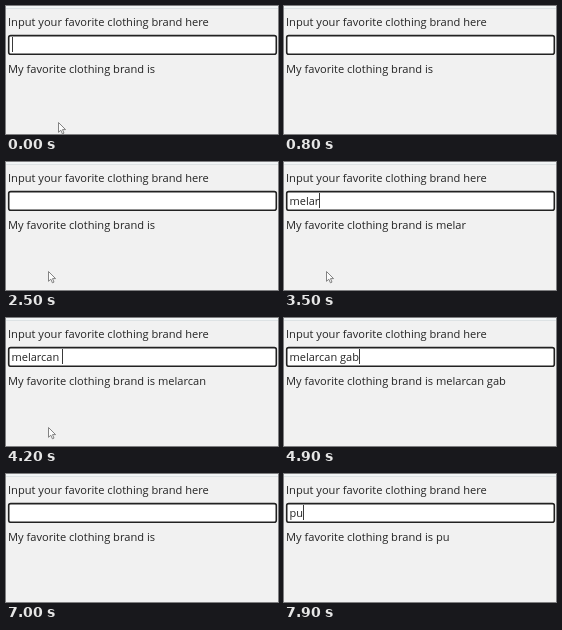
Write an HTML page that moves like this. It is 272 px wide and 128 px high and loops after 8000 ms.

```html
<!DOCTYPE html>
<html lang="en">
<head>
<meta charset="utf-8">
<title>Live input</title>
<style>
  html, body { margin: 0; width: 100%; height: 100%; overflow: hidden; background: #f1f1f1; }
  #stage {
    position: relative; width: 272px; height: 128px; overflow: hidden;
    background: #f1f1f1; color: #242424;
    font: 11.1px/15px "Open Sans", "Noto Sans", sans-serif;
  }
  #stage > * { position: absolute; box-sizing: border-box; white-space: pre; }
  .bar { left: 0; top: 0; width: 272px; height: 3px; background: #f2f5f6; border-bottom: 1px solid #dde2e4; }
  .label { left: 2px; top: 8px; }
  .result { left: 2px; top: 55px; }
  .field { left: 0; top: 0; width: 272px; height: 128px; }
  .value { left: 5.5px; top: 31px; height: 15px; font-size: 11px; }
  #caret { position: absolute; left: 100%; top: 0; width: 1px; height: 15px; background: #3a3a3a; }
  #pointer { left: 0; top: 0; width: 10px; height: 14px; overflow: visible; }
</style>
</head>
<body>
<div id="stage">
  <div class="bar"></div>
  <div class="label">Input your favorite clothing brand here</div>
  <svg class="field">
    <rect x="2.7" y="29.6" width="267.6" height="18.6" rx="2" fill="#fff" stroke="#222" stroke-width="1.6"/>
  </svg>
  <div class="value"><span id="typed"></span><i id="caret"></i></div>
  <div class="result">My favorite clothing brand is <span id="echo"></span></div>
  <svg id="pointer" viewBox="0 0 10 14">
    <path d="M.5 .5V10.3L2.8 8.2L4.4 11.8L6 11.1L4.5 7.6H7.6Z" fill="#fbfbfb" stroke="#777" stroke-width=".9" stroke-linejoin="round"/>
  </svg>
</div>
<script>
const LOOP = 8000;
const BLINK = 525;
const $ = id => document.getElementById(id);
const typed = $("typed"), echo = $("echo"), caret = $("caret"), pointer = $("pointer");

// Each run adds its letters at an even pace, the first at start, the last at end.
const runs = [
  { add: "melar", start: 3000, end: 3500 },
  { add: "can ", start: 3700, end: 4200 },
  { add: "gable", start: 4500, end: 5175 },
  { add: "pu", start: 7700, end: 7900 }
];
const ERASE = 6400; // one word per 100 ms

function state(t) {
  let text = "", lastKey = -225;
  for (const { add, start, end } of runs) {
    if (t < start) break;
    if (start > ERASE) text = "";
    const pace = (end - start) / (add.length - 1);
    const count = Math.min(add.length, Math.floor((t - start) / pace + 1.001));
    text += add.slice(0, count);
    lastKey = start + (count - 1) * pace;
  }
  if (t >= ERASE && lastKey < ERASE) {
    text = t < ERASE + 100 ? text.replace(/\S+$/, "") : "";
  }
  return { text, caretOn: Math.floor((t - lastKey) / BLINK) % 2 === 0 };
}

function tip(t) {
  if (t < 2500) {
    const p = Math.min(1, Math.max(0, (t - 400) / 300));
    return [52, 116 + 14 * p * p];
  }
  return [42, t < 4500 ? 109 : 140];
}

function draw(t) {
  const { text, caretOn } = state(t);
  if (typed.textContent !== text) typed.textContent = echo.textContent = text;
  caret.style.opacity = caretOn ? 1 : 0;
  const [x, y] = tip(t);
  pointer.style.transform = `translate(${x}px, ${y}px)`;
}

const start = performance.now();
function tick() {
  draw((performance.now() - start) % LOOP);
  requestAnimationFrame(tick);
}
tick();
</script>
</body>
</html>
```
